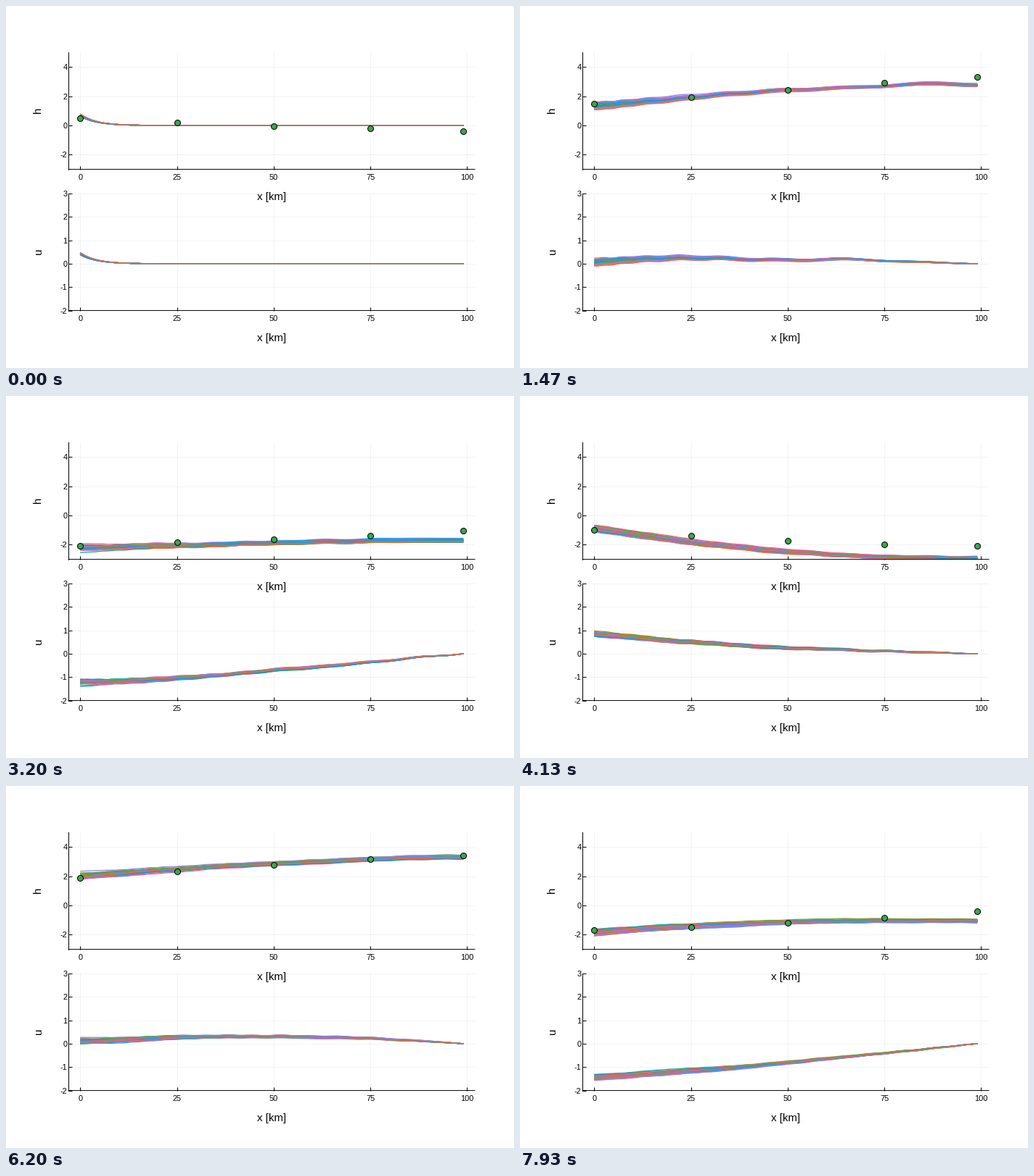
These frames come from a looping animation (700x500 px, 8 s). A matplotlib script:

```python
import numpy as np
import matplotlib.pyplot as plt
from matplotlib.animation import FuncAnimation
from matplotlib.collections import LineCollection

plt.rcParams["font.family"] = "Liberation Sans"

W, H, DPI = 700, 500, 100
PX = 72 / DPI  # points per pixel
STEPS, SUB = 120, 2  # model steps per loop, drawn frames per step
FRAMES = STEPS * SUB
CELLS, MEMBERS = 100, 50
COLORS = ["#009AFA", "#E36F47", "#3EA44E", "#C371D2", "#AC8E18", "#00AAAE",
          "#ED5E93", "#C68225", "#00A98D", "#8E971E", "#00A9CC", "#9B7FE9",
          "#618DF6", "#F06073", "#DD65B6", "#6C9F33"]
km = np.arange(CELLS)
steps = np.arange(STEPS)

# Key points (step, level): the tide that drives the model, and one period
# of the tide observed at the mouth and at the head of the estuary
DRIVE = [(0, .72), (7, 2.25), (11, 2.57), (16, 2.2), (33, -.6), (48, -2.18),
         (54, -2.1), (65, -.35), (75, 1.27), (82, 2.5), (86, 2.55),
         (93, 1.98), (107, -.4), (119, -1.86)]
PERIOD = 74
MOUTH = [(0, .48), (5, 1.5), (11, 2.42), (14, 2.38), (19, 1.87), (33, -.17),
         (45, -1.7), (48, -2.08), (54, -2.35), (63, -.85)]
HEAD = [(0, -.42), (6, .25), (11, 1.23), (19, 3.4), (23, 3.25), (33, 1.6),
        (45, -.38), (48, -1.03), (61, -2.15), (68, -1.4)]
LAG = 8  # steps the tide takes from mouth to head
STATION_KM = np.array([0, 25, 50, 75, 99])


def curve(points, t):
    """Cubic Hermite curve through unevenly spaced key points."""
    x, y = np.array(points, float).T
    slope = np.gradient(y, x)
    i = np.clip(np.searchsorted(x, t, "right") - 1, 0, len(x) - 2)
    gap = x[i + 1] - x[i]
    s = (t - x[i]) / gap
    return (y[i] * (1 + 2 * s) * (1 - s) ** 2
            + slope[i] * gap * s * (1 - s) ** 2
            + y[i + 1] * s ** 2 * (3 - 2 * s)
            + slope[i + 1] * gap * s ** 2 * (s - 1))


def tide(points, t):
    wrapped = [(x + k * PERIOD, y) for k in (-1, 0, 1) for x, y in points]
    return curve(wrapped, t % PERIOD)


def observe():
    """Blend the mouth and head tides, each delayed to the station."""
    part = STATION_KM / STATION_KM[-1]
    t = steps[:, None]
    return ((1 - part) * tide(MOUTH, t - LAG * part)
            + part * tide(HEAD, t + LAG * (1 - part)))


def simulate():
    """Linear shallow water waves, Crank-Nicolson on a staggered grid."""
    rng = np.random.default_rng(7)
    g, depth, dt, dx = 9.81, 20.0, 600.0, 1e5 / (CELLS + .5)
    drag = 1 / (.06 * 86400)
    size = 2 * CELLS
    a, b = np.eye(size), np.zeros((size, size))
    for i in range(1, size - 1):
        odd = i % 2
        k = (g if odd else depth) * dt / dx / 2
        f = drag * dt / 2 if odd else 0
        a[i, i - 1:i + 2] = -k, 1 + f, k
        b[i, i - 1:i + 2] = k, 1 - f, -k
    inv = np.linalg.inv(a)

    sea = curve(DRIVE, steps)
    state = np.zeros((size, MEMBERS))
    noise = np.zeros(MEMBERS)
    out = []
    for level in sea:
        noise = .92 * noise + .042 * rng.standard_normal(MEMBERS)
        mean = state.mean(axis=1, keepdims=True)
        rhs = b @ (mean + .94 * (state - mean))  # pull members together
        rhs[0] = level + noise
        state = inv @ rhs
        out.append(state.T)
    out = np.array(out)
    return out[:, :, 0::2], out[:, :, 1::2]


level, speed = simulate()
stations = observe()

fig = plt.figure(figsize=(W / DPI, H / DPI), dpi=DPI, facecolor="white")


def label(x, y, text, size, **kw):
    fig.text(x / W, 1 - y / H, text, fontsize=size * PX, color="black", **kw)


def panel(top, bottom, low, high, yticks, name, name_x):
    left, right = 86.4, 646
    ax = fig.add_axes([left / W, 1 - bottom / H,
                       (right - left) / W, (bottom - top) / H])
    ax.set_xlim(-2.97, 101.97)
    ax.set_ylim(low, high)
    ax.patch.set_visible(False)
    ax.set_axisbelow(True)
    ax.set_xticks(range(0, 101, 25))
    ax.set_yticks(yticks)
    ax.tick_params(direction="in", length=5 * PX, width=PX,
                   labelbottom=False, labelleft=False)
    ax.grid(color="black", alpha=.06, linewidth=.8 * PX)
    for side, spine in ax.spines.items():
        spine.set_visible(side in ("left", "bottom"))
        spine.set_linewidth(PX)
    ax.spines["bottom"].set_snap(False)
    for x in range(0, 101, 25):
        px = left + (x + 2.97) / 104.94 * (right - left)
        label(px, bottom + 14.4, str(x), 11, ha="center", va="baseline")
    for y in yticks:
        py = bottom - (y - low) / (high - low) * (bottom - top)
        label(84.5, py + 4, str(y), 11, ha="right", va="baseline")
    label(366.5, bottom + 42.3, "x [km]", 15, ha="center", va="baseline")
    label(name_x, (top + bottom) / 2 - .8, name, 15, rotation=90,
          ha="center", va="center")
    lines = LineCollection([], colors=COLORS, linewidths=1.3 * PX)
    ax.add_collection(lines, autolim=False)
    return ax, lines


ax_h, lines_h = panel(64, 225.6, -3, 5, [-2, 0, 2, 4], "h", 44)
ax_u, lines_u = panel(259, 420.6, -2, 3, [-2, -1, 0, 1, 2, 3], "u", 45)
dots, = ax_h.plot(STATION_KM, stations[0], "o", markersize=8 * PX,
                  markerfacecolor="#3EA44E", markeredgecolor="black",
                  markeredgewidth=PX, zorder=5)


def draw(frame):
    n = min((frame + 1) // SUB, STEPS - 1)
    for lines, field in ((lines_h, level), (lines_u, speed)):
        lines.set_segments([np.column_stack((km, y)) for y in field[n]])
    dots.set_ydata(stations[n])
    return lines_h, lines_u, dots


anim = FuncAnimation(fig, draw, frames=FRAMES, init_func=lambda: draw(0),
                     interval=8000 / FRAMES, repeat=True, repeat_delay=0)
plt.show()
```
